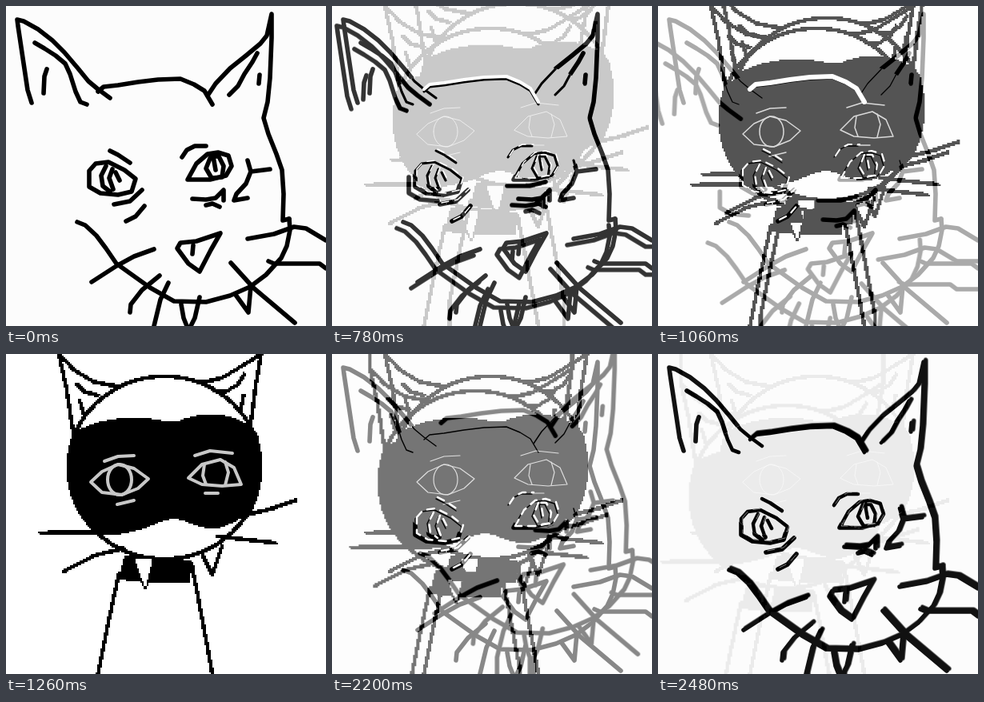
Recreate the animation shown at these times as an HTML page with a canvas. Size 400 by 400 pixels, loop 2520 ms.

```html
<!DOCTYPE html>
<html lang="en">
<head>
<meta charset="utf-8">
<title>Two cats</title>
<style>
  html, body { margin: 0; width: 100%; height: 100%; overflow: hidden; background: #fff; }
  canvas { display: block; width: 100vmin; height: 100vmin; }
</style>
</head>
<body>
<canvas id="stage" width="400" height="400"></canvas>
<script>
const SIZE = 400, PAD = 40, FULL = SIZE + 2 * PAD;
const LOOP = 2520, STEP = 40, STEPS = 15;
const DRIFT = { x: 40, y: -39 };
const PAPER = '#030303', PEN = 5.6;

// Outlined cat, grouped by how the parts drift. Lines run on past the stage edge.
const sketch = {
  leftEar: [
    'M32 121L27 105L24 85L18 45L15 25L14 17L22 19L40 29L58 43L73 58L90 78L103 94L115 104L130 115',
    'M36 46L48 53L62 62L74 72L80 85L87 107L93 120L101 123',
    'M51 79L48 88L47 109'
  ],
  rightSide: [
    'M252 112L262 97L280 78L300 62L318 47L326 37L332 10L332 40L330 90L327 120L322 140L328 160L338 185L345 205L347 235L346 268L354 266',
    'M314 59L308 70L298 85L290 100L279 111M317 86L316 97',
    'M302 193L306 207L300 222L288 235L285 243L302 240M306 207L330 204'
  ],
  crown: ['M115 107L122 101L140 99L165 95L190 92L218 91L235 98L248 106L258 123'],
  eyes: [
    'M130 181L140 186L155 196',
    'M104 206L112 197L128 195L148 205L162 216L157 232L140 236L118 234L104 226Z',
    'M125 200L119 212L121 225L130 232M133 204L129 215L134 229M137 208L142 218',
    'M135 248L155 244L170 230M150 269L162 263L173 250',
    'M220 189L226 180L236 175L250 175',
    'M227 217L238 197L252 185L265 183L278 187L282 200L275 212L255 217Z',
    'M256 188L250 203L257 215L270 214L272 200L266 188L259 188L262 205'
  ],
  lower: [
    'M354 266L355 280L351 300L344 315L325 336L305 351L280 362L250 370L210 369L180 352L138 322L125 303L113 287L99 274L89 270',
    'M233 241L250 242L262 240L272 230L272 243M250 249L258 247L267 251',
    'M214 303L218 296L238 294L268 284L256 305L242 332L228 322ZM234 299L233 310',
    'M107 345L138 325L160 313L185 304',
    'M192 337L170 355L156 373L155 383M203 346L193 367L185 400V440',
    'M219 373L222 390L226 400V440M242 364L236 390L231 400V440M287 361L303 383L306 350',
    'M302 291L335 285L360 276L375 278L400 293H440',
    'M328 319L335 322L392 322L400 328H440M281 321L310 353L361 396'
  ]
};
const eyeRims = ['M104 206L104 226L118 234L140 236', 'M227 217L255 217L275 212'];

// Masked cat.
const masked = {
  fills: [
    'M83 100Q105 85 130 82Q162 76 190 82Q208 89 225 80Q245 74 270 76Q295 80 314 98Q321 125 319 155Q316 180 308 195Q290 211 262 219Q240 217 222 208Q203 204 190 211Q155 227 125 226Q108 218 95 203Q79 175 76 135Z',
    'M148 252L141 282L185 287L230 285L232 258L190 256Z'
  ],
  tooth: 'M161 257L183 257L174 293Z',
  lines: [
    'M66 -40V0L75 40L84 98M66 0L85 20L110 35L143 41',
    'M88 37L98 47L115 52M92 58L97 75',
    'M319 -40V0L312 40L305 95M319 0L295 15L270 30L243 36',
    'M298 25L290 38L275 47L262 46L243 35M297 52L293 72',
    'M43 224L80 222L143 223M72 272L110 252L147 243',
    'M300 201L330 194L362 183M264 228L300 232L337 236',
    'M246 252L258 276L270 240',
    'M141 275L128 335L115 400V440M232 262L245 330L258 400V440'
  ],
  eyes: [
    'M106 160L120 147L140 138L160 143L178 156L165 168L145 176L120 173Z',
    'M127 157A15 19 0 1 0 157 157A15 19 0 1 0 127 157',
    'M123 134L140 128L160 127M139 188L160 183',
    'M228 155L245 138L268 132L285 142L294 163L270 165L245 163Z',
    'M248 138L246 152L250 163M274 135L278 148L274 164',
    'M236 127L255 121L283 124M249 174L265 174'
  ]
};
const maskShape = new Path2D(masked.fills[0]);

function sheet(size) {
  const c = document.createElement('canvas');
  c.width = c.height = size;
  return c.getContext('2d', { willReadFrequently: size < SIZE });
}

function stroke(g, paths, color, width) {
  g.strokeStyle = color;
  g.lineWidth = width;
  g.lineCap = g.lineJoin = 'round';
  paths.forEach(d => g.stroke(new Path2D(d)));
}

// Ink is kept as light on black and inverted when a picture is composed.
function sketchInk(...groups) {
  const g = sheet(FULL);
  g.fillStyle = PAPER;
  g.fillRect(0, 0, FULL, FULL);
  g.translate(PAD, PAD);
  groups.forEach(paths => stroke(g, paths, '#fff', PEN));
  return g.canvas;
}

// Drawn small and hardened for stair-stepped edges.
function maskedInk() {
  const half = FULL / 2, s = sheet(half);
  s.fillStyle = '#000';
  s.fillRect(0, 0, half, half);
  s.scale(0.5, 0.5);
  s.translate(PAD, PAD);
  s.fillStyle = '#fff';
  masked.fills.forEach(d => s.fill(new Path2D(d)));
  s.strokeStyle = '#fff';
  s.lineWidth = 5;
  s.beginPath();
  s.ellipse(198, 142, 120, 114, 0, 0, 7);
  s.stroke();
  stroke(s, masked.lines, '#fff', 4.8);
  stroke(s, [masked.tooth], '#fff', 4);
  s.fillStyle = '#000';
  s.fill(new Path2D(masked.tooth));
  const img = s.getImageData(0, 0, half, half);
  img.data.forEach((v, i) => { if (i % 4 < 3) img.data[i] = v > 127 ? 255 : 0; });
  s.putImageData(img, 0, 0);
  const g = sheet(FULL);
  g.imageSmoothingEnabled = false;
  g.drawImage(s.canvas, 0, 0, FULL, FULL);
  return g.canvas;
}

const sketchParts = Object.values(sketch);
const sketchAll = sketchInk(...sketchParts);
const sketchOut = sketchInk(sketch.leftEar, sketch.lower, eyeRims);
const sketchIn = sketchInk(sketch.rightSide, sketch.crown, sketch.lower);
const maskedAll = maskedInk();
const layer = sheet(SIZE);
const stage = document.getElementById('stage').getContext('2d');

// Details inside the mask thin out quickly as their picture loses weight.
const thin = (width, weight) => width * (0.22 + 0.78 * weight ** 4);

function thinInsideMask(weight) {
  layer.save();
  layer.clip(maskShape);
  layer.fillStyle = PAPER;
  layer.fillRect(0, 0, SIZE, SIZE);
  sketchParts.forEach(paths => stroke(layer, paths, '#fff', thin(PEN, weight)));
  layer.restore();
}

// One picture plus its drifting double, the darker ink winning.
function addPicture(isSketch, weight, shift, leaving) {
  const base = isSketch ? sketchAll : maskedAll;
  const copy = isSketch ? (leaving ? sketchOut : sketchIn) : maskedAll;
  layer.globalCompositeOperation = 'source-over';
  layer.drawImage(base, -PAD, -PAD);
  if (isSketch && weight < 1) thinInsideMask(weight);
  if (shift) {
    layer.globalCompositeOperation = 'lighten';
    layer.drawImage(copy, DRIFT.x * shift - PAD, DRIFT.y * shift - PAD);
    layer.globalCompositeOperation = 'source-over';
  }
  if (!isSketch) stroke(layer, masked.eyes, '#373737', thin(4, weight));
  stage.globalAlpha = weight;
  stage.drawImage(layer.canvas, 0, 0);
}

function glints(p, toMask) {
  const w = Math.sin(Math.PI * p);
  stage.save();
  if (toMask) {
    stage.translate(0, -3);
    stroke(stage, sketch.crown, '#fff', 7 * w);
    stage.translate(0, 3);
  }
  stage.translate(2, -2);
  stage.setLineDash([9, 8]);
  stroke(stage, sketch.eyes, '#fff', 2.5 * w);
  stage.restore();
}

function draw(p, toMask) {
  stage.globalCompositeOperation = 'source-over';
  stage.globalAlpha = 1;
  stage.fillStyle = '#000';
  stage.fillRect(0, 0, SIZE, SIZE);
  stage.globalCompositeOperation = 'lighter';
  if (p < 1) addPicture(toMask, 1 - p, -p, true);
  if (p > 0) addPicture(!toMask, p, 1 - p, false);
  stage.globalAlpha = 1;
  stage.globalCompositeOperation = 'difference';
  stage.fillStyle = '#fff';
  stage.fillRect(0, 0, SIZE, SIZE);
  stage.globalCompositeOperation = 'source-over';
  if (p > 0 && p < 1) glints(p, toMask);
}

let last = '';
function tick() {
  const t = performance.now() % LOOP;
  const toMask = t < 1960;
  const k = Math.floor((t - (toMask ? 660 : 1920)) / STEP);
  const p = Math.min(1, Math.max(0, k / STEPS));
  const key = toMask + ':' + p;
  if (key !== last) draw(p, toMask);
  last = key;
  requestAnimationFrame(tick);
}
tick();
</script>
</body>
</html>
```
